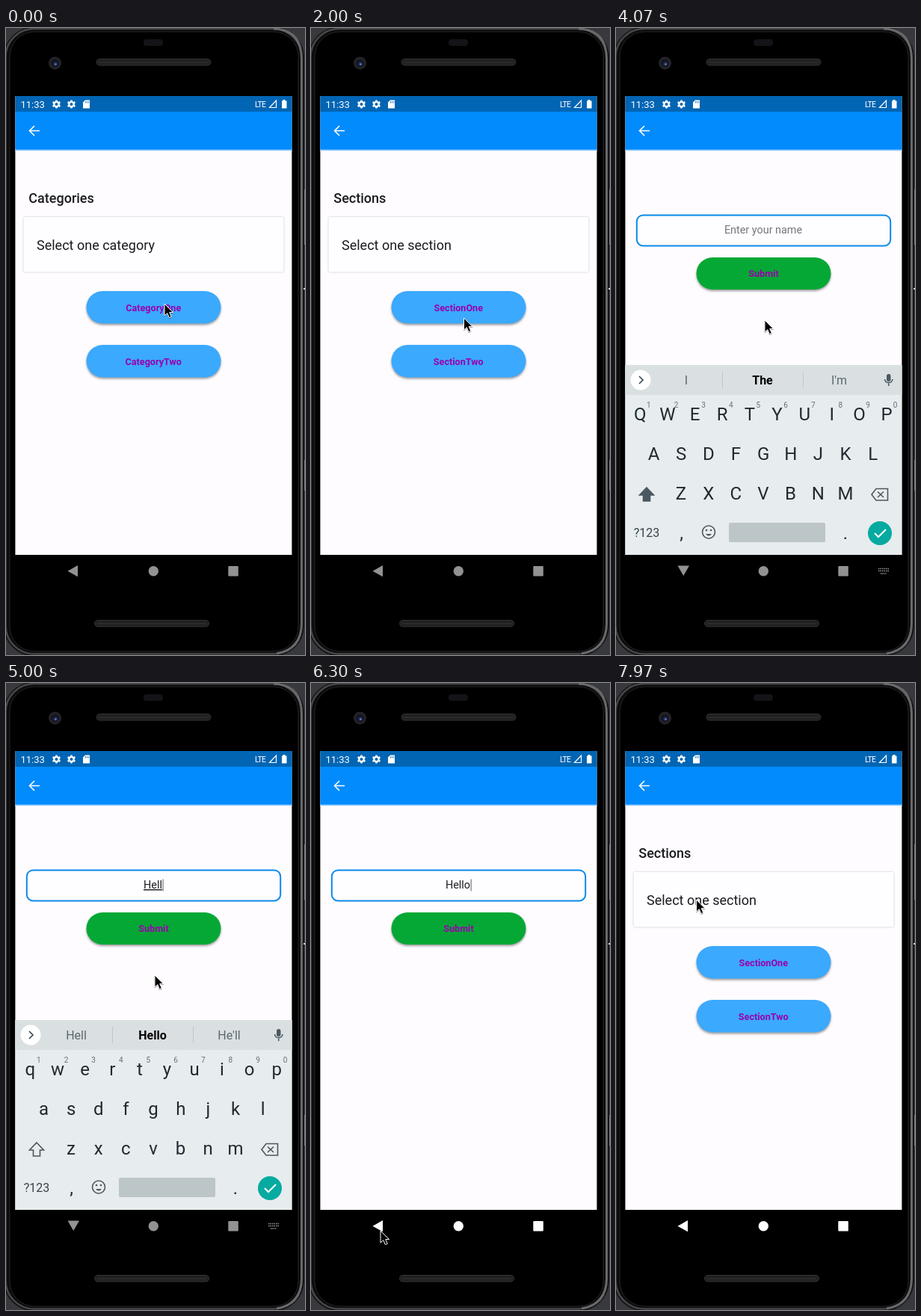
An HTML page that plays this animation: 400x839 px, repeating every 8 s.

```html
<!DOCTYPE html>
<html lang="en">
<head>
<meta charset="utf-8">
<title>Category and name form</title>
<style>
  html, body { margin: 0; width: 100%; height: 100%; overflow: hidden; background: #303236; }
  svg { display: block; width: 100%; height: 100%; font-family: Roboto, sans-serif; }
  .mid { text-anchor: middle; }
  .line { fill: none; stroke-width: 1.6; }
  .title { font-size: 18px; font-weight: 500; fill: #1c1b1f; }
  .lead { font-size: 18px; fill: #1c1b1f; }
  .label { font-size: 12.6px; font-weight: 700; fill: #9a00ad; text-anchor: middle; }
  .raised { filter: drop-shadow(0 2px 1.8px rgba(0, 0, 0, .38)); }
  .card { fill: #fefdff; filter: drop-shadow(0 .7px 1px rgba(0, 0, 0, .25)); }
  .field { font-size: 14.4px; text-anchor: middle; }
  .key { font-size: 24px; fill: #202a30; text-anchor: middle; }
  .digit { font-size: 10px; fill: #667177; text-anchor: middle; }
  .hint { font-size: 16px; fill: #5b666c; text-anchor: middle; }
  .hint.best { font-weight: 700; fill: #000; }
</style>
</head>
<body>
<svg viewBox="0 0 400 839" preserveAspectRatio="none">
  <defs>
    <clipPath id="screenClip"><rect x="12.4" y="91" width="370" height="614"/></clipPath>
    <path id="gear" fill="none" stroke="#fff" d="M0-5.6V-3M0 5.6V3M4.9-2.8L2.6-1.5M-4.9 2.8L-2.6 1.5M4.9 2.8L2.6 1.5M-4.9-2.8L-2.6-1.5" stroke-width="2.5"/>
  </defs>

  <!-- Device -->
  <rect width="400" height="839" fill="#38393c"/>
  <g fill="none">
    <rect x="-3" y="-1" width="401.500" height="841" rx="40" fill="#0c0c0d" stroke="#1b1b1d"/>
    <rect x="-.5" y="1" width="396" height="836.500" rx="38" stroke="#47474a" stroke-width="2.500"/>
    <rect x="5" y="5" width="386" height="829" rx="33" fill="#000" stroke="#252527"/>
    <path d="M358 1Q395.500 2 395.500 42V797Q395 832 362 837" stroke="#69696c" stroke-width="3"/>
  </g>
  <path d="M399.500 216V290M399.500 578V619" stroke="#77777a"/>
  <path d="M398 349H400" stroke="#ddd" stroke-width="2"/>
  <rect x="184" y="15" width="26" height="9" rx="4" fill="#131318"/>
  <g fill="#202020" stroke="#343434">
    <rect x="121" y="41.5" width="153" height="8.5" rx="4.2"/>
    <rect x="118.500" y="792.5" width="153" height="8.5" rx="4.2"/>
  </g>
  <path d="M124 46H271M122 797H268" stroke="#2b2b2b" stroke-width="2"/>
  <circle cx="65.500" cy="47" r="8.5" fill="#242428"/>
  <circle cx="65.500" cy="47" r="5.5" fill="#15161f"/>
  <circle cx="66" cy="48" r="2.6" fill="#25306a"/>
  <circle cx="66.500" cy="48.500" r="1" fill="#8c9ae0"/>

  <g clip-path="url(#screenClip)">
    <rect x="12" y="91" width="371" height="614" fill="#fefcff"/>
    <rect x="12" y="162" width="371" height="2" fill="#8cc8fa"/>
    <rect x="12" y="164" width="371" height="1" fill="#e2effb"/>
    <rect x="12" y="112" width="371" height="50.600" fill="#018bfd"/>
    <rect x="12" y="91" width="371" height="21" fill="#0165b4"/>
    <text x="19.500" y="106.500" font-size="13" fill="#fff">11:33</text>
    <g id="gears" fill="none" stroke="#fff"></g>
    <path d="M106 96.500H112V107.500H103V99.500Z" fill="#fff"/>
    <path d="M106.500 98V100.500M108.500 98V100.500M110.500 98V100.500" stroke="#0165b4" stroke-width=".8"/>
    <text x="333" y="105.500" font-size="10.500" letter-spacing="-.8" fill="#fff">LTE</text>
    <path d="M352.500 106.500H361.500V97Z" fill="none" stroke="#fff" stroke-width="1.2"/>
    <path d="M369 97.500H370.500V96H373.500V97.500H375.500V107.500H369Z" fill="#fff"/>
    <path d="M45 137.500H32M38 131L31.500 137.500L38 144" class="line" stroke="#fff"/>

    <g id="categories"></g>
    <g id="sections"></g>

    <g id="form">
      <rect id="box" rx="8.5" fill="#fefdff"/>
      <text id="placeholder" class="field" x="197" y="402" fill="#77757b">Enter your name</text>
      <text id="typed" class="field" x="196.500" y="402" fill="#1c1b1f"></text>
      <rect id="caret" y="389.500" width="1.2" height="16" fill="#777"/>
      <rect class="raised" x="107.500" y="434" width="180" height="43" rx="21.5" fill="#05a835"/>
      <text class="label" x="197.500" y="460.400">Submit</text>
    </g>

    <g id="keyboard">
      <rect x="12" y="451" width="371" height="254" fill="#e7ecee"/>
      <rect x="12" y="451" width="371" height="40" fill="#dae0e2"/>
      <path d="M142.500 460V482M250.500 460V482" stroke="#bfc7ca"/>
      <circle cx="33" cy="471" r="13.5" fill="#fff"/>
      <path d="M31 466L36 471L31 476" class="line" stroke="#37474f"/>
      <g id="hints"></g>
      <rect x="362" y="463" width="5.500" height="10" rx="2.7" fill="#4b585f"/>
      <path d="M359.500 470A5.300 5.300 0 0 0 370 470M364.750 475.500V479" class="line" stroke="#4b585f"/>
      <g id="keys"></g>
      <path id="shift" d="M41 615L50.500 625H45.500V633H36.500V625H31.500Z" class="line" stroke="#4b585f"/>
      <path d="M348 616.500H363.500V632H348L342 624.250ZM350 620.500L358 628M358 620.500L350 628" class="line" stroke="#4b585f"/>
      <text x="41" y="681" class="mid" font-size="16" fill="#36434a">?123</text>
      <text x="87.500" y="684" class="key">,</text>
      <circle cx="124" cy="674.500" r="8.500" class="line" stroke="#4b585f"/>
      <path d="M120 677Q124 682 128 677Z" fill="#4b585f"/>
      <circle cx="121" cy="672" r="1.300" fill="#4b585f"/><circle cx="127" cy="672" r="1.300" fill="#4b585f"/>
      <rect x="151" y="662" width="129" height="26" rx="2" fill="#bcc5c8"/>
      <text x="307" y="684" class="key">.</text>
      <circle cx="353" cy="676" r="16" fill="#06aaa0"/>
      <path d="M346 676L351 681L361 671" fill="none" stroke="#fff" stroke-width="2"/>
    </g>
  </g>

  <!-- Navigation -->
  <g id="nav">
    <path id="back" d="M82.500 726.700L96 719V734.300Z"/>
    <path id="down" d="M82.500 719.500H98L90.250 733Z"/>
    <circle cx="197.300" cy="726.700" r="6.700"/>
    <rect x="297.300" y="720" width="13.500" height="13.500" rx="1"/>
  </g>
  <path id="switcher" d="M351 723.500H365M351 726.500H365M354 730H362" stroke="#999" stroke-width="1.500" stroke-dasharray="1.500 1"/>

  <path id="cursor" d="M0 0V16L3.800 12.600L6.400 18.600L9.300 17.300L6.700 11.500H11.500Z" fill="#000" stroke="#fff" style="filter:drop-shadow(.5px 1px .7px rgba(0,0,0,.4))"/>
</svg>

<script>
const LOOP = 8000;
const TAPS = { categories: 1210, sections: 2720 };
const TO_SECTIONS = 1530, TO_FORM = 2950, BACK_TO_SECTIONS = 7200;
const FOCUS = 3430, KEYBOARD_OPEN = 3540, FORM_UP = 3720;
const KEYBOARD_CLOSE = 6050, KEYBOARD_GONE = 6230, FORM_DOWN = 6350;

const TYPING = [
  { at: 0, text: "", hints: ["I", "The", "I'm"] },
  { at: 4400, text: "H", hints: ["H", "How", "Hey"] },
  { at: 4570, text: "He", hints: ["He", "Hey", "Hello"] },
  { at: 4750, text: "Hel", hints: ["Hel", "Help", "Hello"] },
  { at: 4920, text: "Hell", hints: ["Hell", "Hello", "He'll"] },
  { at: 5120, text: "Hello", hints: ["Hello's", "Hello", "Hello!"] },
];

// Pointer stops: time, x, y
const POINTER = [
  [60, 212, 369], [800, 204.5, 388], [2530, 204.5, 388], [3150, 199, 391],
  [5250, 199, 391], [5830, 101, 761], [6030, 93, 733], [6330, 93, 733],
  [6690, 62, 440], [7030, 37, 138], [7270, 37, 138], [7880, 107.5, 290],
];

const $ = id => document.getElementById(id);
const show = (id, on) => { $(id).style.visibility = on ? "visible" : "hidden"; };
const within = (t, from, to) => t >= from && t < to;
const setAttrs = (id, attrs) => {
  for (const [name, value] of Object.entries(attrs)) $(id).setAttribute(name, value);
};
const ramp = (t, from, to) => {
  const k = Math.min(1, Math.max(0, (t - from) / (to - from)));
  return k * k * (3 - 2 * k);
};

function choiceButton(y, label, id) {
  const overlay = id ? `<g id="${id}"><path d="M107.500 355H287.500V392H107.500Z" fill="#777" opacity=".13"/>
    <path d="M129 352H266Q287.500 353 287.500 374Q287 395 266 395.500H129Q108 395 107.500 374Q108 353 129 352Z" fill="#aab0c0" opacity=".13"/>
    <circle cx="204.500" cy="388" r="9" fill="#889cb0" opacity=".45"/></g>` : "";
  return `<rect class="raised" x="107.500" y="${y}" width="180" height="43.500" rx="21.750" fill="#3ba9fe"/>
    ${overlay}<text class="label" x="197.250" y="${y + 26.7}">${label}</text>`;
}

function choicePage(id, title, noun) {
  $(id).innerHTML = `<text class="title" x="30.300" y="233.700">${title}</text>
    <rect class="card" x="23.500" y="253" width="348" height="73.500" rx="2"/>
    <text class="lead" x="41" y="296.700">Select one ${noun.toLowerCase()}</text>
    ${choiceButton(352, noun + "One", id + "Tap")}${choiceButton(424, noun + "Two")}`;
}

function buildKeys() {
  const rows = [["qwertyuiop", 32.3, 525], ["asdfghjkl", 50.5, 578], ["zxcvbnm", 87, 631]];
  $("keys").innerHTML = rows.map(([letters, x0, y], row) =>
    [...letters].map((c, i) => {
      const x = x0 + 36.65 * i;
      const digit = row ? "" : `<text class="digit" x="${x + 11.5}" y="507.500">${(i + 1) % 10}</text>`;
      return `<text class="key letter" x="${x}" y="${y}">${c}</text>${digit}`;
    }).join("")).join("");
  $("hints").innerHTML = [94, 196, 298.5].map((x, i) =>
    `<text class="hint${i === 1 ? " best" : ""}" x="${x}" y="477">-</text>`).join("");
}

$("gears").innerHTML = [67.5, 87.5].map(x => `<g transform="translate(${x} 102)">
  <use href="#gear"/><circle r="3.200" stroke-width="2.300"/></g>`).join("");
choicePage("categories", "Categories", "Category");
choicePage("sections", "Sections", "Section");
buildKeys();

const letters = [...document.querySelectorAll(".letter")];
const hints = [...document.querySelectorAll(".hint")];
let shownStep = null;

function setTyping(step) {
  if (step === shownStep) return;
  shownStep = step;
  const upper = step.text === "";
  $("typed").textContent = step.text;
  $("caret").setAttribute("x", 197 + $("typed").getComputedTextLength() / 2);
  $("shift").style.fill = upper ? "#4b585f" : "none";
  letters.forEach(el => {
    el.textContent = upper ? el.textContent.toUpperCase() : el.textContent.toLowerCase();
  });
  hints.forEach((el, i) => { el.textContent = step.hints[i]; });
}

// The border lies inside the field's outer edge.
function setBox(focused) {
  const border = focused ? 2 : 1;
  setAttrs("box", {
    x: 26.8 + border / 2, y: 376.4 + border / 2,
    width: 341.4 - border, height: 43.1 - border,
    stroke: focused ? "#098be9" : "#5b5a60", "stroke-width": border,
  });
}

function pointerAt(t) {
  const next = POINTER.findIndex(p => p[0] > t);
  if (next === 0) return POINTER[0].slice(1);
  if (next < 0) return POINTER[POINTER.length - 1].slice(1);
  const [t0, x0, y0] = POINTER[next - 1], [t1, x1, y1] = POINTER[next];
  const k = ramp(t, t0, t1);
  return [x0 + (x1 - x0) * k, y0 + (y1 - y0) * k];
}

function render(t) {
  const onForm = within(t, TO_FORM, BACK_TO_SECTIONS);
  const keyboardNav = within(t, FOCUS, KEYBOARD_GONE);
  const step = TYPING.filter(s => s.at <= t).pop();
  setTyping(step);

  $("categories").style.display = t < TO_SECTIONS ? "" : "none";
  $("sections").style.display = t >= TO_SECTIONS && !onForm ? "" : "none";
  $("form").style.display = onForm ? "" : "none";
  for (const [page, at] of Object.entries(TAPS)) {
    $(page + "Tap").style.opacity = within(t, at, at + 300) ? Math.min(1, (at + 300 - t) / 120) : 0;
  }

  setAttrs("form", { transform: `translate(0 ${within(t, FORM_UP, FORM_DOWN) ? -127 : 0})` });
  setBox(within(t, KEYBOARD_OPEN, BACK_TO_SECTIONS));
  $("placeholder").style.display = step.text ? "none" : "";
  $("typed").style.textDecoration = t < KEYBOARD_CLOSE ? "underline" : "none";
  const blinkStart = Math.max(step.at, FOCUS);
  $("caret").style.display = t >= FOCUS && (t - blinkStart) % 1000 < 500 ? "" : "none";

  const raised = ramp(t, KEYBOARD_OPEN, FORM_UP) - ramp(t, KEYBOARD_CLOSE, KEYBOARD_GONE);
  setAttrs("keyboard", { transform: `translate(0 ${254 * (1 - raised)})` });
  show("keyboard", raised > 0);

  setAttrs("nav", { fill: t < KEYBOARD_GONE ? "#929292" : "#fff" });
  show("down", keyboardNav);
  show("back", !keyboardNav);
  show("switcher", keyboardNav);
  setAttrs("cursor", { transform: `translate(${pointerAt(t)})` });
}

const start = performance.now();
function tick() {
  render((performance.now() - start) % LOOP);
  requestAnimationFrame(tick);
}
tick();
</script>
</body>
</html>
```
